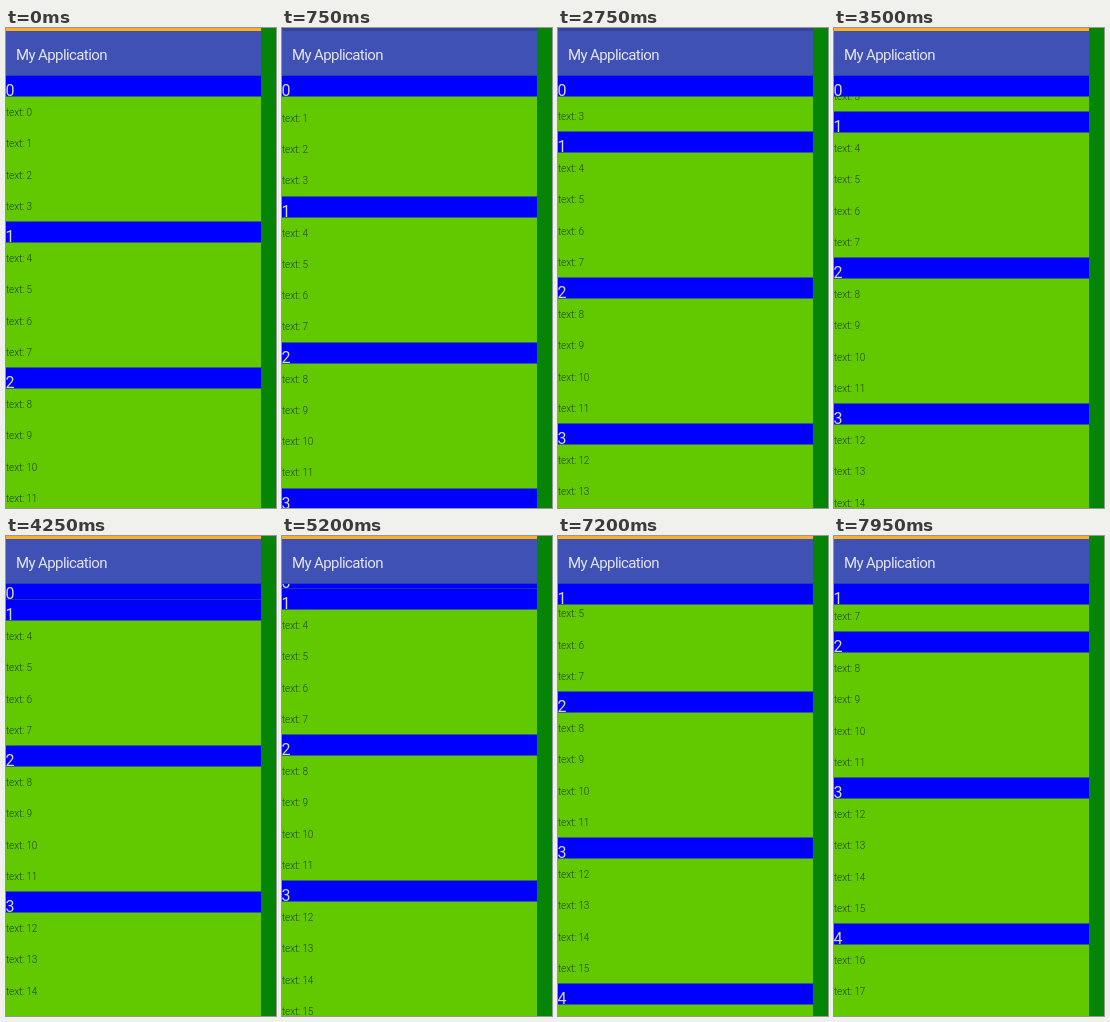
Animation, 270 px wide and 480 px high, one loop 8 s. Source, as an HTML page:

```html
<!DOCTYPE html>
<html lang="en">
<head>
<meta charset="utf-8">
<title>Sticky headers</title>
<style>
  html, body { margin: 0; width: 100%; height: 100%; overflow: hidden; }
  body { position: relative; background: #058405; font-family: Roboto, sans-serif; }
  #screen { position: absolute; left: 0; top: 0; width: 255px; height: 480px; overflow: hidden; background: #62c800; }
  .row, .header { position: absolute; left: 0; top: 0; width: 255px; white-space: pre; }
  .row { height: 31px; line-height: 31px; font-size: 10px; font-weight: 300; letter-spacing: -.1px; color: #1f4400; }
  .header { box-sizing: border-box; height: 22px; line-height: 29px; font-size: 16px; text-indent: -.5px; color: #d8d8a8;
    background: #0000ff padding-box; border: solid rgba(0, 0, 255, .5); border-width: 1px 0; overflow: hidden; z-index: 1; }
  #status, #toolbar { position: absolute; left: 0; width: 255px; z-index: 2; }
  #status { top: 0; height: 3px; }
  #toolbar { top: 3px; height: 45px; line-height: 48px; box-sizing: border-box; padding-left: 10px;
    background: #3f51b5; border-bottom: 1px solid #2c3cb8; color: #e4e4ee; font-size: 15px; letter-spacing: -.6px; }
</style>
</head>
<body>
<div id="screen">
  <div id="status"></div>
  <div id="toolbar">My Application</div>
</div>
<script>
const LOOP = 8000, STEP = 50;
const LIST_TOP = 47, HEADER = 21, ROW = 31.25, PER_SECTION = 4, SECTIONS = 5;
const SECTION = HEADER + PER_SECTION * ROW;
// [time in ms, scroll offset in px]
const SCROLL = [[0, 0], [1450, 49], [2750, 90], [4250, 130], [6150, 152], [7200, 184], [7950, 244], [8000, 248]];
const STATUS_HIDDEN = [700, 3500];

const screenEl = document.getElementById('screen');
const statusEl = document.getElementById('status');

function add(className, text) {
  const el = document.createElement('div');
  el.className = className;
  el.textContent = text;
  screenEl.append(el);
  return el;
}

const sections = Array.from({ length: SECTIONS }, (_, s) => ({
  header: add('header', s),
  rows: Array.from({ length: PER_SECTION }, (_, r) => add('row', `text: ${s * PER_SECTION + r}`))
}));

function scrollAt(t) {
  const i = SCROLL.findIndex(([time]) => time > t);
  const [t0, y0] = SCROLL[i - 1], [t1, y1] = SCROLL[i];
  return y0 + (y1 - y0) * (t - t0) / (t1 - t0);
}

function moveTo(el, y) {
  el.style.transform = `translateY(${Math.round(y)}px)`;
}

function draw(t) {
  const scroll = scrollAt(t);
  sections.forEach(({ header, rows }, s) => {
    const top = LIST_TOP + s * SECTION - scroll;
    // A pinned header is pushed out by the one below it.
    moveTo(header, Math.max(top, Math.min(LIST_TOP, top + SECTION - HEADER)));
    rows.forEach((row, r) => moveTo(row, top + HEADER + 1 + r * ROW));
  });
  const hidden = t >= STATUS_HIDDEN[0] && t < STATUS_HIDDEN[1];
  statusEl.style.background = hidden ? '#35459f' : '#ffb020';
}

const start = performance.now();
function tick() {
  const t = (performance.now() - start) % LOOP;
  draw(Math.floor(t / STEP) * STEP);
  requestAnimationFrame(tick);
}
tick();
</script>
</body>
</html>
```
